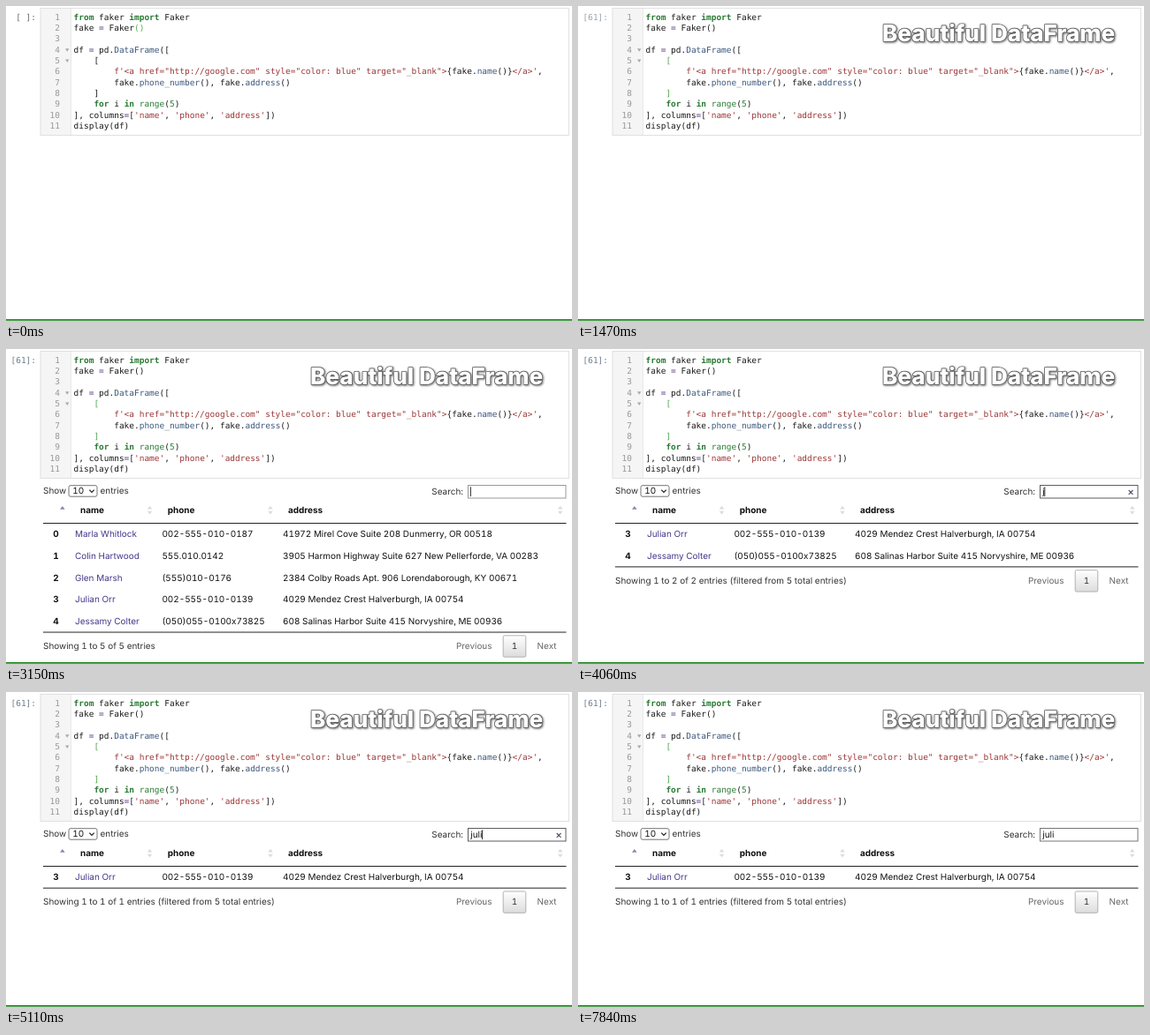
Write an HTML page that moves like this. It is 640 px wide and 357 px high and loops after 8.12 s.

```html
<!DOCTYPE html>
<html lang="en">
<head>
<meta charset="utf-8">
<title>Beautiful DataFrame</title>
<style>
  html, body { margin: 0; height: 100%; overflow: hidden; background: #fff; }
  svg { display: block; width: 100%; height: 100%; }
  text { white-space: pre; text-rendering: geometricPrecision; }
  .code text { font: 9.47px "DejaVu Sans Mono", monospace; fill: #1a1a1a; }
  .code .num { fill: #999; text-anchor: end; }
  .code .prompt { text-anchor: end; }
  .k { fill: #2a7a34; font-weight: bold; }
  .b { fill: #2a7a34; }
  .s { fill: #9c3636; }
  .o { fill: #7d5f9c; font-weight: bold; }
  .p { fill: #3d587c; }
  .n { fill: #2f8038; }
  .ui text { font: 9.95px Inter, sans-serif; font-variant-numeric: tabular-nums; fill: #111; }
  .ui .soft { fill: #333; }
  .ui .dim { fill: #666; }
  .ui .link { fill: #43388a; }
  .ui .bold { font-weight: 700; }
  .ui .mid { text-anchor: middle; }
  .title {
    font: 800 26.1px Inter, sans-serif; text-anchor: middle;
    fill: #fff; stroke: #5a5a5a; stroke-width: 1.5; stroke-linejoin: round; paint-order: stroke;
    filter: drop-shadow(1.6px 1.8px .9px rgba(0, 0, 0, .55));
  }
</style>
</head>
<body>
<svg viewBox="0 0 640 357">
  <defs>
    <linearGradient id="btn" x2="0" y2="1">
      <stop offset="0" stop-color="#fff"/><stop offset="1" stop-color="#dcdcdc"/>
    </linearGradient>
  </defs>

  <g class="code">
    <rect x="39" y="2.5" width="34.5" height="144" fill="#f5f5f5"/>
    <path d="M73.5 3V146" stroke="#e4e4e4" stroke-width=".8"/>
    <rect id="cell" x="39" y="2.5" width="597.5" height="144" fill="none"/>
    <text id="prompt" class="prompt" x="34" y="16"></text>
    <g id="code"></g>
  </g>

  <g id="table" class="ui">
    <text class="soft" x="42" y="164">Show</text>
    <rect x="71" y="154.7" width="32" height="12.5" rx="2" fill="#fff" stroke="#666" stroke-width=".9"/>
    <text x="75.2" y="164.2">10</text>
    <path d="M94.3 159.6l2.7 2.8 2.7-2.8" fill="none" stroke="#222" stroke-width="1.3"/>
    <text class="soft" x="106.5" y="164">entries</text>

    <text class="soft" x="481.3" y="164.9">Search:</text>
    <rect id="box" x="522.5" y="154.5" width="110.5" height="14.5" fill="#fff" stroke-width="1"/>
    <text id="query" x="525.3" y="164.6"></text>
    <path id="caret" d="M0 156.3v10.8" stroke="#333" stroke-width="1"/>
    <path id="clear" d="M622.7 160l4.8 4.8m0-4.8l-4.8 4.8" stroke="#4c5468" stroke-width="1.2"/>

    <g id="head"></g>
    <g id="rows"></g>
    <path d="M42 197.5H633.5" stroke="#222" stroke-width="1"/>
    <g id="foot">
      <path d="M42 -.6H633.5" stroke="#222" stroke-width="1"/>
      <text id="info" class="soft" x="42" y="18.4"></text>
      <text class="dim" x="508.9" y="18.4">Previous</text>
      <rect x="562.2" y="3.2" width="25.6" height="24.3" rx="1.5" fill="url(#btn)" stroke="#aaa" stroke-width=".9"/>
      <text class="soft mid" x="575" y="18.4">1</text>
      <text class="dim" x="600.6" y="18.4">Next</text>
    </g>
  </g>

  <text id="title" class="title" x="475.6" y="40">Beautiful DataFrame</text>
  <rect y="355" width="640" height="1.6" fill="#0c7c0c"/>
</svg>

<script>
const LOOP = 8120, PITCH = 24.7;
const $ = id => document.getElementById(id);
const span = (cls, s) => `<tspan class="${cls}">${s}</tspan>`;
const k = x => span('k', x), s = x => span('s', x), p = x => span('p', x);
const eq = span('o', '=');

const lines = [
  `${k('from')} faker ${k('import')} Faker`,
  `fake ${eq} Faker${span('call', '()')}`,
  '',
  `df ${eq} pd.${p('DataFrame')}([`,
  `    ${span('list', '[')}`,
  `        ${s(`f'&lt;a href="http://google.com" style="color: blue" target="_blank"&gt;`)}` +
    `{fake.${p('name')}()}${s(`&lt;/a&gt;'`)},`,
  `        fake.${p('phone_number')}(), fake.${p('address')}()`,
  `    ${span('list', ']')}`,
  `    ${k('for')} i ${k('in')} ${span('b', 'range')}(${span('n', '5')})`,
  `], columns${eq}[${s("'name'")}, ${s("'phone'")}, ${s("'address'")}])`,
  'display(df)'
];
$('code').innerHTML = lines.map((line, i) => {
  const y = 15.8 + i * 12.33;
  const fold = i === 3 || i === 4
    ? `<path d="M67 ${y - 4.6}h4.4l-2.2 3.6z" fill="#aaa"/>` : '';
  return `<text class="num" x="61" y="${y}">${i + 1}</text>${fold}<text x="76.6" y="${y}">${line}</text>`;
}).join('');

const people = [
  ['Marla Whitlock', '002-555-010-0187', '41972 Mirel Cove Suite 208 Dunmerry, OR 00518'],
  ['Colin Hartwood', '555.010.0142', '3905 Harmon Highway Suite 627 New Pellerforde, VA 00283'],
  ['Glen Marsh', '(555)010-0176', '2384 Colby Roads Apt. 906 Lorendaborough, KY 00671'],
  ['Julian Orr', '002-555-010-0139', '4029 Mendez Crest Halverburgh, IA 00754'],
  ['Jessamy Colter', '(050)055-0100x73825', '608 Salinas Harbor Suite 415 Norvyshire, ME 00936']
];
$('rows').innerHTML = people.map(([name, phone, address], i) => `<g>
  <text class="bold mid" x="56.5">${i}</text><text class="link" x="78">${name}</text>
  <text x="176.4">${phone}</text><text x="313">${address}</text></g>`).join('');
const rows = [...$('rows').children];

const sorter = x => `<path d="M${x - 2.8} 181.6h5.6l-2.8-3.8zm0 2.2h5.6l-2.8 3.8z" fill="#dcdce0"/>`;
$('head').innerHTML =
  '<path d="M61 181.8h5.6l-2.8-3.8z" fill="#8587b4"/>' +
  [['name', 84, 162.5], ['phone', 182.7, 299], ['address', 319, 626.7]]
    .map(([label, x, icon]) => `<text class="bold" x="${x}" y="186.4">${label}</text>${sorter(icon)}`).join('');

// [start, value] steps, in ms
const prompts = [[0, '[ ]:'], [1190, '[*]:'], [1400, '[61]:']];
const queries = [[0, ''], [3850, 'j'], [4200, 'ju'], [4410, 'jul'], [4620, 'juli']];
const carets = [[0, false], [3080, true], [3640, false], [3850, true], [5180, false], [5670, true], [6090, false]];
const at = (steps, t) => steps.filter(([start]) => start <= t).pop()[1];

const show = (el, on) => el.style.display = on ? '' : 'none';
const paint = (cls, color) =>
  document.querySelectorAll('.' + cls).forEach(el => el.style.fill = color);

function draw(t) {
  const editing = t >= 70 && t < 1190;
  const typing = t >= 3850 && t < 6090;

  $('cell').setAttribute('stroke', editing ? '#64a0c8' : '#e0e0e0');
  paint('call', t < 70 ? '#4fb04f' : '');
  paint('list', t < 70 ? '' : '#4fa64f');
  $('prompt').textContent = at(prompts, t);
  $('prompt').style.fill = t < 1190 ? '#666' : t < 3080 ? '#9aa3ad' : '#6c7a8c';

  const f = Math.min(1, Math.max(0, (t - 980) / 420));
  $('title').style.opacity = f * f * (3 - 2 * f);

  show($('table'), t >= 1540);
  const query = at(queries, t);
  let n = 0;
  rows.forEach((row, i) => {
    const hit = people[i].join(' ').toLowerCase().includes(query);
    show(row, hit);
    if (hit) row.setAttribute('transform', `translate(0 ${213.2 + PITCH * n++})`);
  });
  $('foot').setAttribute('transform', `translate(0 ${198.1 + PITCH * n})`);
  $('info').textContent = `Showing 1 to ${n} of ${n} entries` +
    (query ? ` (filtered from ${people.length} total entries)` : '');

  $('box').setAttribute('stroke', typing ? '#5c5c5c' : query ? '#767676' : '#999');
  $('query').textContent = query;
  const end = query ? $('query').getComputedTextLength() : 0;
  $('caret').setAttribute('transform', `translate(${525.4 + end} 0)`);
  show($('caret'), at(carets, t));
  show($('clear'), typing);
}

function tick() {
  draw(performance.now() % LOOP);
  requestAnimationFrame(tick);
}
tick();
</script>
</body>
</html>
```
